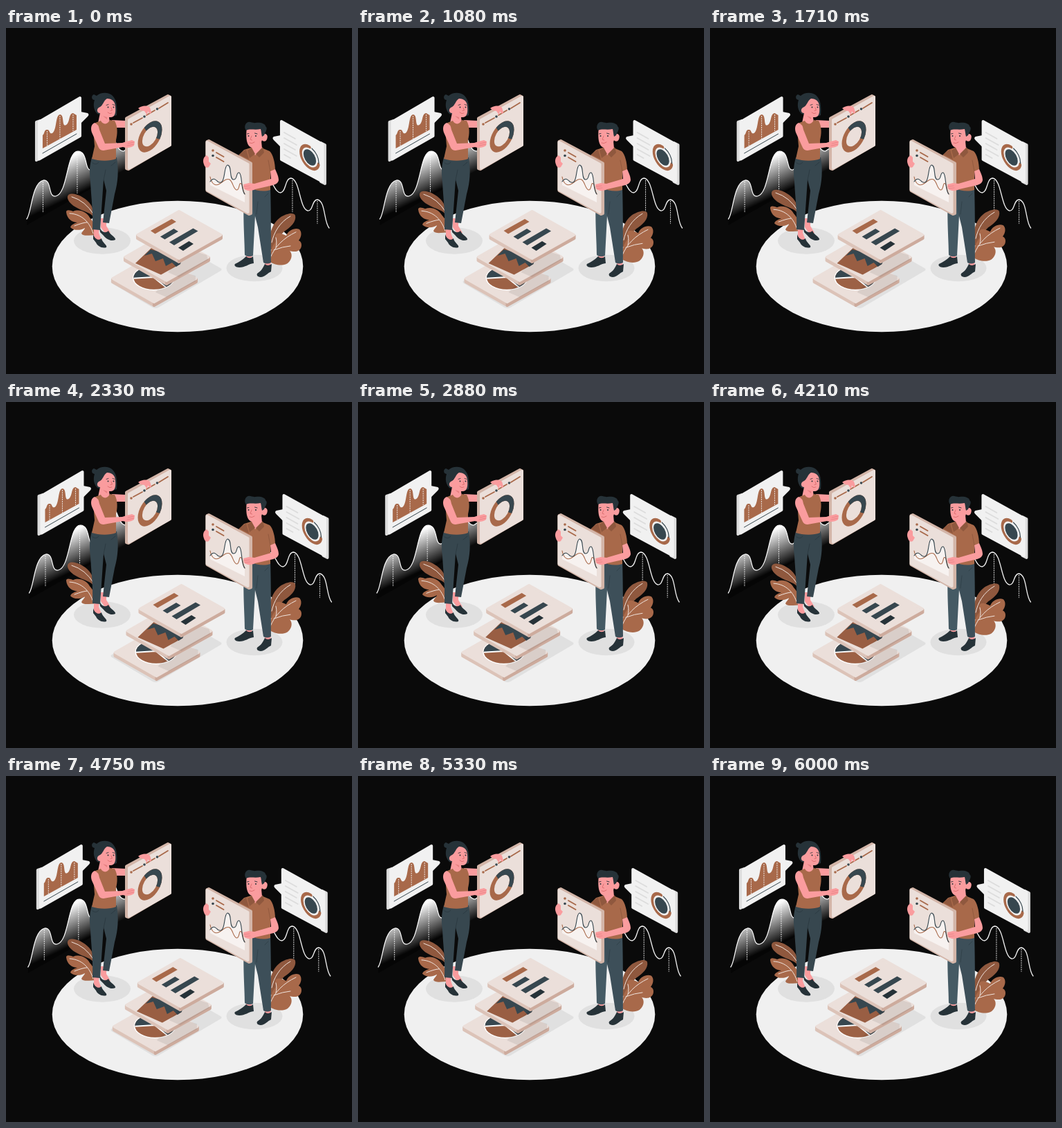
An HTML page for the animation above (6040 ms loop, 500 by 500 pixels).

```html
<!DOCTYPE html>
<html lang="en">
<head>
<meta charset="utf-8">
<title>Data presentation</title>
<style>
html, body { margin: 0; width: 100%; height: 100%; overflow: hidden; background: #0a0a0a; }
svg { display: block; width: 100vw; height: 100vh; }
.brown { fill: #a8694a; }
.deep { fill: #8f583e; }
.dark { fill: #37474f; }
.ink { fill: #263238; }
.skin { fill: #fa9c9e; }
.pale { fill: #f0f0f0; }
.shade { fill: #e0e0e0; }
.face { fill: #ebdfda; stroke: #ebdfda; stroke-width: 4; stroke-linejoin: round; }
.edge { fill: #d3b5a8; stroke: #d3b5a8; stroke-width: 4; stroke-linejoin: round; }
.card { fill: #f1f1f1; stroke: #f1f1f1; stroke-width: 4; stroke-linejoin: round; }
.rim { fill: #dcdcdc; stroke: #dcdcdc; stroke-width: 4; stroke-linejoin: round; }
.line { fill: none; stroke-linecap: round; stroke-linejoin: round; }
.dash { fill: none; stroke: #f5f5f5; stroke-width: .9; stroke-dasharray: 2 1.2; }
.vein { fill: none; stroke: #f0e4de; stroke-width: 1; stroke-linecap: round; }
</style>
</head>
<body>
<svg viewBox="0 0 500 500">
  <defs>
    <linearGradient id="fade" gradientUnits="userSpaceOnUse" x1="76" y1="194" x2="99" y2="242">
      <stop offset="0" stop-color="#fff"/>
      <stop offset="1" stop-color="#050505"/>
    </linearGradient>
    <clipPath id="pie"><ellipse cx="213.500" cy="361" rx="29" ry="16.700"/></clipPath>
    <g id="slab">
      <path fill="#dcc3b8" stroke="#dcc3b8" stroke-width="4" stroke-linejoin="round" d="M190 300 250 334V338L190 304Z"/>
      <path fill="#cdab9d" stroke="#cdab9d" stroke-width="4" stroke-linejoin="round" d="M311 300 250 334V338L311 304Z"/>
      <path class="face" d="M190.500 299 250 265 310.500 299 250 333Z"/>
    </g>
  </defs>

  <!-- floor -->
  <ellipse class="pale" cx="248" cy="344.500" rx="181.300" ry="94.700"/>
  <g class="shade">
    <path d="M153 365Q150 367 153 369L212 404Q216 406 220 404L310 351Q313 349 310 347L250 313Z"/>
    <ellipse cx="139" cy="307.500" rx="41" ry="19.300"/>
    <ellipse cx="359" cy="347" rx="40.500" ry="19.300"/>
  </g>

  <!-- back charts and speech bubbles -->
  <g class="shake">
    <path fill="url(#fade)" d="M30 276C37 268 37 224 54 220C67 219 60 245 72 243C90 239 87 178 104 178C119 178 113 207 123 205C134 202 132 150 146 148C158 148 157 178 170 178L176 174V202L30 285Z"/>
    <path class="line" stroke="#fff" stroke-width="1.200" d="M30 276C37 268 37 224 54 220C67 219 60 245 72 243C90 239 87 178 104 178C119 178 113 207 123 205C134 202 132 150 146 148C158 148 157 178 170 178L176 174"/>
    <path class="dash" d="M53.500 222V267M103 180V239"/>

    <path class="line" stroke="#f0f0f0" stroke-width="1.300" d="M376 216C386 219 388 238 397 238C405 237 403 217 412 217C425 219 424 261 436 264C444 265 442 248 450 248C462 250 459 280 467 289"/>
    <path class="dash" d="M414 220V266M450 250V283"/>

    <path class="pale" d="M108 121 118 123Q121 125 118 128L108 138Z"/>
    <path class="rim" d="M44 136 50 134V188L44 191Z"/>
    <path class="card" d="M48 135.500 107 101V156L48 189.500Z"/>
    <path class="brown" d="M53 174V155C56 153 55 147 59 147C64 146 62 154 67 152C74 147 71 126 78 125C85 125 80 144 87 140C93 136 90 124 97 123L102 126V147Z"/>
    <path class="dash" d="M59.500 149V170M78 127V160M97 125V149"/>
    <path class="line" stroke="#37474f" stroke-width="1" d="M53 181 102 153"/>

    <path class="pale" d="M397 155 387 157Q384 159 387 162L397 172Z"/>
    <path class="rim" d="M455 166 461 169V225L455 222Z"/>
    <path class="card" d="M398 135 457.500 168V222L398 190Z"/>
    <path class="line" stroke="#dcdcdc" stroke-width="1.700" d="M402 151 418 160M402 159 420 169M402 167 418 176M402 175 420 185M402 183 411 188"/>
    <g transform="matrix(.866 .5 0 1 439 187)" class="line">
      <circle r="15" stroke="#a8694a" stroke-width="4.200" pathLength="100" stroke-dasharray="72 28" stroke-dashoffset="-3"/>
      <circle r="15" stroke="#37474f" stroke-width="1.600" pathLength="100" stroke-dasharray="22 78" stroke-dashoffset="-79"/>
      <circle class="dark" r="10.500"/>
    </g>
  </g>

  <!-- plants -->
  <g class="float">
    <path class="deep" d="M128 276C124 266 112 266 101 259C90 253 86 244 91 240.500C97 237 112 243 120 252C126 259 128 268 129 276Z"/>
    <path class="vein" d="M95 244Q115 250 127 270"/>
    <path class="brown" d="M131 299C122 299 112 302 109 297C110 294 114 291 114 289C107 293 98 293 93 288C94 284 100 282 103 281C96 281 88 276 87 266C87 262 92 263 97 265C106 261 117 266 121 274C127 280 131 290 131 299Z"/>
    <path class="vein" d="M92 268C110 269 121 281 126 297M99 286Q112 281 117 281"/>
  </g>
  <g class="float">
    <path class="deep" d="M380 320C380 300 383 284 396 274C405 268 416 266 418 271C420 280 411 288 402 294C395 300 392 309 387 320Z"/>
    <path class="vein" d="M411 272C395 281 387 296 384 310"/>
    <path class="brown" d="M382 338C381 324 384 314 391 308C387 300 390 295 397 297C402 298 404 300 405 300C408 292 418 288 424 291C428 295 427 302 423 307C429 309 428 320 422 322C418 324 413 323 410 322C414 326 414 334 407 340C399 345 387 342 382 338Z"/>
    <path class="vein" d="M419 295C400 304 388 317 382 332M390 303Q392 312 390 317M387 321Q400 316 411 315"/>
  </g>

  <!-- stacked tiles -->
  <g class="shake">
    <use href="#slab" x="-36" y="63"/>
    <ellipse cx="213.500" cy="361" rx="30.500" ry="18.200" fill="#fff"/>
    <g clip-path="url(#pie)">
      <path fill="#9c6145" d="M180 340H246V380H180Z"/>
      <path class="dark" d="M213 360 180 362V335H246L238 348ZM213 360 246 356V380H239Z"/>
      <path class="line" stroke="#fff" stroke-width="1.800" d="M180 362 213 360 239 381M213 360 246 356"/>
    </g>
    <path opacity=".08" d="M216 382 232 389 274 366 274 358 246 350Z"/>
    <use href="#slab" x="-18" y="32"/>
    <path fill="#995e43" d="M187 340 210 318 252 341 224 356.500Z"/>
    <path class="dark" d="M200 329 209 320 255 332 252 341 246 345 240 339 231 344 227 333 216 337 211 326Z"/>
    <path opacity=".08" d="M234 353 250 360 292 335 290 328 264 320Z"/>
    <use href="#slab"/>
    <g transform="translate(-.5 -1)">
      <path class="brown" d="M209.500 294 240 277 246.500 281 216 298.500Z"/>
      <path class="dark" d="M223.500 302.500 243 291 249.500 295 230 306.500ZM236.500 310.500 271 290.500 278 294.500 243.500 315Z"/>
      <path class="ink" d="M249.500 318.500 265 309 271.500 313 256.500 323Z"/>
    </g>
  </g>

  <!-- woman -->
  <g>
    <path class="skin" d="M137 275 145 275 145 286 151 296 143 296 137 288ZM127 286 135 287 134 296 139 309 132 309 127 302Z"/>
    <path class="ink" d="M135 287C137 294 143 298 148 293C150 299 159 302 158 306C152 309 145 305 141 300L136 295ZM126 298C128 305 134 308 138 304C139 310 147 314 145 317C139 319 132 315 130 310L126 305Z"/>
    <path class="dark" d="M124 187H160C163 206 162 222 157 240L149 282 140 281 145 235 141 219 136 292 125 291C126 264 123 245 122 222C120 207 121 198 124 187Z"/>
    <path class="line" stroke="#2a383f" stroke-width=".8" d="M141 220 144 205M125 195Q130 199 134 194M158 194 152 199"/>
    <path class="skin" d="M153 133 173 134V144L156 144Z"/>
    <path class="ink" d="M132 124C126 118 126 110 128 104C123 104 123 97 127 96L131 98C136 93 148 92 154 98C160 104 161 114 160 126L154 128 136 125Z"/>
    <path class="skin" d="M136 123 148 123 150 136 142 143 133 137Z"/>
    <path class="brown" d="M129 137 137 134C140 140 147 140 150 133L157 134C162 143 161 154 159 162L159 189C149 193 133 192 124 189L128 171 126 146Z"/>
    <path class="skin" d="M136 114C140 112 141 105 146 102C153 102 158 106 158 114C159 123 157 129 151 129C143 129 139 127 136 123C131 123 130 116 136 114Z"/>
    <path fill="#e67f80" d="M140 127 146 129 146 132Z"/>
    <circle class="ink" cx="147.500" cy="114.500" r="1"/>
    <circle class="ink" cx="155.500" cy="114.500" r="1"/>
    <path class="line" stroke="#263238" stroke-width=".8" d="M145 111.500 148 110.500M154 110.500 157 111.500"/>
    <path class="line" stroke="#d56466" stroke-width=".8" d="M152 115 153.500 119 151 119.500M147 122Q150 125 153 123"/>

    <path class="edge" d="M174 130.500 234 98 237 99.500V169L177 204 174 203Z"/>
    <path class="face" d="M178 133 237 100V169L178 202.500Z"/>
    <path class="line" stroke="#a8694a" stroke-width="1.800" d="M184 137 197 130M203 126 215 119M221 116 234 108"/>
    <circle class="brown" cx="181" cy="139" r="1.800"/>
    <circle class="dark" cx="200" cy="128" r="1.800"/>
    <circle class="dark" cx="218.500" cy="117" r="1.800"/>
    <g transform="matrix(.866 -.5 0 1 208 157)" fill="none" stroke-width="7.400">
      <circle r="16.500" stroke="#a8694a"/>
      <circle r="16.500" stroke="#37474f" pathLength="100" stroke-dasharray="43 57" stroke-dashoffset="33"/>
    </g>
    <path class="skin" d="M191 116C196 112 204 111 208 115L210 122C208 126 206 122 205 120L204 126 200 120 195 119Z"/>
    <path class="skin" d="M128 137C123 139 122 145 124 151L134 173Q136 177 141 177L169 172C174 174 181 173 185 170L186 164 182 162 174 164 168 166 143 167 135 147Q134 139 128 137Z"/>
    <path class="line" stroke="#e47f81" stroke-width=".7" d="M176 167 185 165M175 170 185 168"/>
  </g>

  <!-- man -->
  <g>
    <path class="skin" d="M347 320H356L355 336 347 336ZM374 332H383L382 346 374 347Z"/>
    <path class="ink" d="M347 330C350 333 354 333 357 330L358 340C350 341 346 346 337 346C332 346 329 343 331 341C337 338 342 335 347 330ZM374 341C377 344 381 343 384 341L383 352C378 354 374 360 368 360C363 360 361 356 364 354C369 351 371 347 374 341Z"/>
    <path fill="#455a64" d="M344 235H366L360 271 357 329Q350 332 345 328C345 306 342 277 344 235Z"/>
    <path fill="#3d4f59" d="M356 232 382 230C383 258 383 305 383 339Q377 342 372 339L364 288 358 264Z"/>
    <path class="line" stroke="#2f3f47" stroke-width=".8" d="M362 269 364 251M379 239 374 244"/>
    <path class="brown" d="M336 184 344 176 357 172 369 173 381 178C386 182 389 196 389 205L382 208V234C372 237 362 235 354 232L343 190Z"/>
    <path class="deep" d="M337 183 347 175 351 190Z"/>
    <path class="line" stroke="#8f583e" stroke-width=".9" d="M379 191 382 207"/>
    <path class="skin" d="M356 165 369 163 370 174 360 184 355 175Z"/>
    <path class="deep" d="M355 173 360 182 352 188 349 177ZM371 172 373 180 366 187 361 182Z"/>
    <path class="skin" d="M348 143H371L372 153C377 152 379 156 377 161C375 165 371 164 370 162C368 169 362 173 356 173C348 172 346 160 348 143Z"/>
    <path class="ink" d="M347 148C345 146 344 140 348 137C352 134 356 138 361 137C367 136 375 138 375 142C379 145 375 150 373 155L370 157C369 153 369 150 368 146C359 148 353 145 347 148Z"/>
    <circle class="ink" cx="350.500" cy="156" r="1"/>
    <circle class="ink" cx="361" cy="156" r="1"/>
    <path class="line" stroke="#263238" stroke-width=".9" d="M348.500 153 351 152.500M359.500 152 363 153"/>
    <path class="line" stroke="#d56466" stroke-width=".8" d="M355 156 353 161 355.500 162M352 166Q355 168 359 165"/>

    <path class="edge" d="M290.500 164 293 163 354 195.500V268L351 269 290.500 235Z"/>
    <path class="face" d="M290.500 165 349.500 197V266L290.500 233.500Z"/>
    <path class="line" stroke="#a8694a" stroke-width="1.900" d="M304 180 314.500 186M304 187 314.500 193"/>
    <circle class="brown" cx="299" cy="177" r="1.800"/>
    <circle class="dark" cx="299" cy="184.500" r="1.800"/>
    <path fill="#fff" opacity=".6" d="M295 222C299 216 302 218 306 222C318 230 314 199 320 198C327 198 322 219 329 219C335 219 332 208 337 209C342 212 339 234 345 240V252L295 227Z"/>
    <g class="line" stroke-width="1.100">
      <path stroke="#a8694a" d="M295 215C297 226 303 229 309 225C315 221 319 217 323 219C328 222 328 232 333 234C338 235 336 222 340 225C343 228 342 236 345 240"/>
      <path stroke="#37474f" d="M295 222C299 216 302 218 306 222C318 230 314 199 320 198C327 198 322 219 329 219C335 219 332 208 337 209C342 212 339 234 345 240"/>
    </g>
    <path class="skin" d="M290 184C285 186 284 192 286 197C287 201 290 203 293 201L296 196 293 193 293 187Z"/>
    <path class="skin" d="M382 207 389 204C392 211 394 215 394 220C393 225 388 227 382 228L360 233C355 236 347 236 344 232L343 226 351 224 359 225 383 218Z"/>
    <path class="line" stroke="#e47f81" stroke-width=".7" d="M344 229 352 228M345 232 353 231"/>
  </g>
</svg>
<script>
const LOOP = 6040, CYCLE = 6000, LEAD = 30;
// horizontal shift at every tenth of the cycle
const SHAKE = [0, -1, 2, -4, 4, -4, 4, -4, 2, -1, 0];
const RISE = 10;

const shaking = document.querySelectorAll('.shake');
const floating = document.querySelectorAll('.float');
const move = (parts, x, y) =>
  parts.forEach(el => el.setAttribute('transform', `translate(${x} ${y})`));

function draw() {
  const phase = (performance.now() % LOOP + LEAD) / CYCLE % 1;
  const step = Math.floor(phase * 10), part = phase * 10 - step;
  move(shaking, SHAKE[step] + (SHAKE[step + 1] - SHAKE[step]) * part, 0);
  move(floating, 0, -RISE * (1 - Math.abs(2 * phase - 1)));
  requestAnimationFrame(draw);
}
draw();
</script>
</body>
</html>
```
